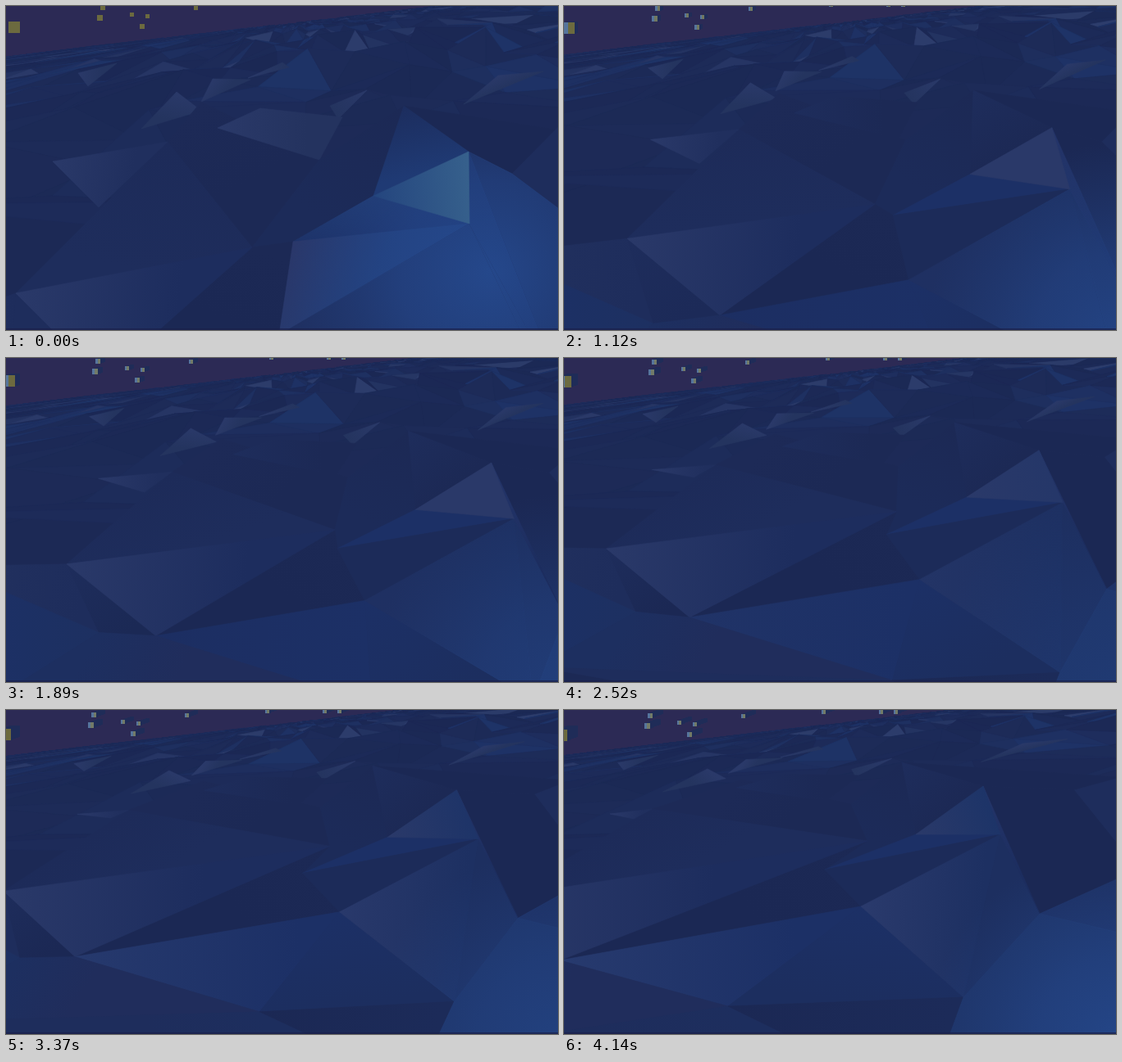
Write an HTML page with a canvas that moves like this. It is 673 px wide and 396 px high and loops after 4.21 s.

```html
<!DOCTYPE html>
<html lang="en">
<head>
<meta charset="utf-8">
<title>Low-poly night terrain</title>
<style>
html, body { margin: 0; width: 100%; height: 100%; overflow: hidden; background: #1c2a57; }
canvas { display: block; width: 673px; height: 396px; }
</style>
</head>
<body>
<canvas id="stage" width="673" height="396"></canvas>
<script>
const W = 673, H = 396, LOOP = 4210, LAST = 4140;
const ctx = document.getElementById('stage').getContext('2d');
const DARK = '#1c2955', DEEP = '#1b2854', SLATE = '#1e2d5c', BLUE = '#1c3066', LIGHT = '#2a3969';

// Corners of the near slopes: start x, y and end x, y.
const corners = {
  A: [564, 178, 511, 93],
  B: [565, 266, 532, 152],
  C: [448, 232, 429, 152],
  D: [350, 288, 318, 195],
  E: [333, 402, 362, 240],
  F: [12, 351, -75, 228],
  G: [118, 457, -5, 306],
  H: [300, 295, 370, 160],
  I: [57, 190, 56, 127],
  J: [113, 246, 85, 133],
  K: [680, 475, 580, 249],
  L: [715, 580, 487, 351],
  M: [430, 540, 200, 362],
  N: [0, 520, -80, 325],
  O: [197, 166, 107, 121],
  P: [617, 205, 622, 98],
  Q: [485, 122, 412, 64],
  T: [800, 342, 700, 195],
  U: [238, 117, 217, 85],
  Z: [382, 188, 350, 115],
  // outside the stage
  R: [760, 165, 720, 85],
  S: [760, 60, 760, 60],
  V: [1300, 700, 1300, 420],
  W: [760, 900, 440, 480],
  X: [-180, 420, -200, 240],
  Y: [-150, 700, -250, 430]
};

// Pale facets further back; these follow the general drift.
const facets = [
  [[252, 89], [298, 90], [238, 117]],
  [[88, 82], [135, 70], [100, 98]],
  [[600, 85], [655, 80], [558, 120]],
  [[440, 103], [405, 138], [395, 122]],
  [[208, 105], [238, 128], [165, 150]],
  [[295, 88], [337, 69], [345, 75]]
];

const stars = [
  [3, 19, 14], [115, -1, 6], [111, 11, 7], [151, 8, 5], [170, 10, 5],
  [163, 22, 6], [229, 0, 5], [327, -5, 5], [397, -5, 5], [415, -5, 5]
];

const lerp = (a, b, k) => a + (b - a) * k;
const clamp = v => Math.max(0, Math.min(1, v));
const skyline = x => 60 - 0.117 * x;

function mix(a, b, k) {
  const part = (s, i) => parseInt(s.slice(i, i + 2), 16);
  return '#' + [1, 3, 5].map(i =>
    Math.round(lerp(part(a, i), part(b, i), clamp(k))).toString(16).padStart(2, '0')).join('');
}

function drift(x, y) {
  const d = y - skyline(x);
  return [x, y, x - 0.29 * d - 13, y - 0.42 * d - 4];
}

// Nearer points swing out further to the right and rise sooner, most on the left.
function place([x0, y0, x1, y1], u) {
  const v = Math.pow(u, 0.87), arc = 4 * v * (1 - v);
  const depth = Math.max(0, y0 - skyline(x0)), rise = y0 - y1;
  const left = clamp(1 - x0 / 300), right = clamp((760 - x0) / 195);
  const swing = (15 * Math.min(1, depth / 40) + 0.2 * depth) * (1 + 0.4 * left) * right;
  const early = (0.06 * rise + rise * rise / 1200) * (1 + 1.2 * left);
  const late = Math.min(110, depth / 2) * u * (1 - u) * (u - 0.4565);
  return [lerp(x0, x1, u) + swing * arc, lerp(y0, y1, u) - early * arc - late];
}

function random(seed) {
  return () => {
    seed = (seed + 0x6d2b79f5) | 0;
    let n = Math.imul(seed ^ (seed >>> 15), 1 | seed);
    n = (n + Math.imul(n ^ (n >>> 7), 61 | n)) ^ n;
    return ((n ^ (n >>> 14)) >>> 0) / 4294967296;
  };
}

// Perspective grid of jittered points, far rows first.
const COLS = 220, rows = [], rnd = random(41);
for (let d = 2.5; d < 330; d *= 1.36) {
  const row = { keys: [], tones: [] };
  for (let j = 0; j <= COLS; j++) {
    const x = 336 + (j - COLS / 2 + (rnd() - 0.5) * 0.9) * d * 0.9;
    row.keys.push(drift(x, skyline(x) + d * (1 + (rnd() - 0.6) * 0.7)));
    row.tones.push(tone(d), tone(d));
  }
  rows.push(row);
}

function tone(d) {
  const r = rnd(), k = rnd();
  if (d > 110) return mix(DARK, SLATE, k * 0.7);
  if (r > 0.9 && d < 70) return mix('#22315f', '#2d3d6c', k);
  return r > 0.65 ? mix(SLATE, '#1e3367', k) : mix(DEEP, SLATE, k * 0.7);
}

function fillPoly(pts, paint) {
  ctx.beginPath();
  pts.forEach(([x, y]) => ctx.lineTo(x, y));
  ctx.closePath();
  ctx.fillStyle = ctx.strokeStyle = paint;
  ctx.fill();
  ctx.stroke();
}

function drawMesh(u) {
  let prev = null;
  for (const row of rows) {
    const pts = row.keys.map(k => place(k, u));
    for (let j = 0; prev && j < COLS; j++) {
      const [a, b, c, e] = [prev[j], prev[j + 1], pts[j + 1], pts[j]];
      if (Math.max(b[0], c[0]) < -5 || Math.min(a[0], e[0]) > W + 5) continue;
      fillPoly([a, b, e], row.tones[2 * j]);
      fillPoly([b, c, e], row.tones[2 * j + 1]);
    }
    prev = pts;
  }
}

function drawSky(u) {
  ctx.fillStyle = '#2c2a55';
  ctx.fillRect(0, 0, W, 70);
  for (const [x, y, s] of stars) {
    const at = k => [Math.round(x - 13 * k), Math.round(y + 5 * k)];
    const box = (k, color, w) => {
      ctx.fillStyle = color;
      ctx.fillRect(...at(k), w, s);
    };
    for (let k = 0; k < u; k += 0.12) box(k, '#1f2c58', s);
    box(u, mix('#6c6a3f', '#727a68', s > 10 ? 0 : u * 3), s);
    if (u > 0) box(u, '#56759c', Math.ceil(s * 0.4));
  }
}

function drawLand(u) {
  const pos = {};
  for (const name in corners) pos[name] = place(corners[name], u);

  // The lamp slides off to the lower right, dims, and comes back.
  const slide = clamp(u * 4), power = 0.25 + 0.6 * Math.abs(Math.cos(2.6 * u));
  const lx = lerp(590, 685, slide), ly = lerp(325, 410, slide);
  const glow = ctx.createRadialGradient(lx, ly, 0, lx, ly, 245);
  glow.addColorStop(0, `rgba(38,76,146,${power})`);
  glow.addColorStop(0.45, `rgba(37,72,140,${power * 0.72})`);
  glow.addColorStop(1, 'rgba(36,68,132,0)');

  // Shades from the first corner to the middle of the others.
  function shade(pts, from, to) {
    const rest = pts.slice(1);
    const mean = i => rest.reduce((s, p) => s + p[i], 0) / rest.length;
    const paint = ctx.createLinearGradient(pts[0][0], pts[0][1], mean(0), mean(1));
    paint.addColorStop(0, from);
    paint.addColorStop(1, to);
    fillPoly(pts, paint);
  }
  function face(names, from, to = from, lit = false) {
    const pts = [...names].map(n => pos[n]);
    shade(pts, from, to);
    if (lit) fillPoly(pts, glow);
  }

  const dawn = u * 3.7;               // settles after the lamp has left
  const dusk = (u - 0.45) * 2.5;      // second half
  const flare = mix(LIGHT, SLATE, dawn);

  for (const f of facets) shade(f.map(p => place(drift(...p), u)), LIGHT, '#24345f');

  // Middle hills
  face('UZHO', '#1d2a57', DARK);
  face('OFH', '#1d2b59', SLATE);
  shade([[258, 149], [310, 125], [410, 136], [382, 188]].map(p => place(drift(...p), u)),
    flare, mix('#24335f', DARK, dawn));
  face('IJO', LIGHT, '#202f5e');
  face('QZHDC', DARK, '#1c2b59');

  // Right side
  face('QRPA', DEEP);
  face('PSRT', SLATE);
  face('APTK', DEEP, DEEP, u < 0.55);
  face('QCA', mix('#1c2d5e', SLATE, dawn), mix('#1f3a74', DARK, dawn));
  face('KTV', '#1d2f61', '#1e3164', true);

  // Foreground
  face('XFN', '#22315f', SLATE);
  face('NXY', '#1d3061', BLUE);
  face('FGN', SLATE, mix(SLATE, DEEP, dawn / 2));
  face('HDEG', DARK, DEEP);
  face('FGH', LIGHT, '#1d2d5e');
  face('CBD', mix('#20396f', BLUE, dawn), BLUE, u < 0.2);
  face('DBE', mix('#2a3769', '#1c2b59', dawn), mix('#223f7a', '#1c2b59', dawn), u < 0.2);
  face('GEM', mix('#1c2e62', '#273a6e', dusk), '#1c3066');
  face('NGMY', '#1d2f60', '#202d5c');
  face('MYW', '#1d2e5e', SLATE);
  face('ELM', BLUE, '#1c2e5f');
  face('EBL', mix('#1f3062', '#2a3a6c', dusk), '#1d3062', true);
  face('MLW', DEEP, '#1c2b59');
  face('BKL', '#1d2f60', '#1d2f60', true);
  face('ABK', mix('#1d3165', '#24356a', dawn), '#1c2d5f', u < 0.4);
  face('LKVW', '#1e3468', '#1e3468', true);
  face('CAB', mix('#24457e', LIGHT, dawn),
    mix(mix('#36608c', LIGHT, dawn), '#1d3468', dusk));
}

function draw(time) {
  const u = time / LAST;
  ctx.lineWidth = 0.6;
  ctx.lineJoin = 'round';
  ctx.fillStyle = DARK;
  ctx.fillRect(0, 0, W, H);
  drawSky(u);
  drawMesh(u);
  drawLand(u);
  ctx.fillStyle = 'rgba(27,32,74,0.7)';
  ctx.fillRect(0, H - 2, W, 2);
}

// The picture holds for 70 ms, once for 80 ms.
function hold(t) {
  const shift = t >= 3370 ? 10 : 0;
  return Math.min(LAST, Math.floor((t - shift) / 70) * 70 + shift);
}

const start = performance.now();
let shown = -1;
function tick() {
  const time = hold((performance.now() - start) % LOOP);
  if (time !== shown) draw(shown = time);
  requestAnimationFrame(tick);
}
tick();
</script>
</body>
</html>
```
